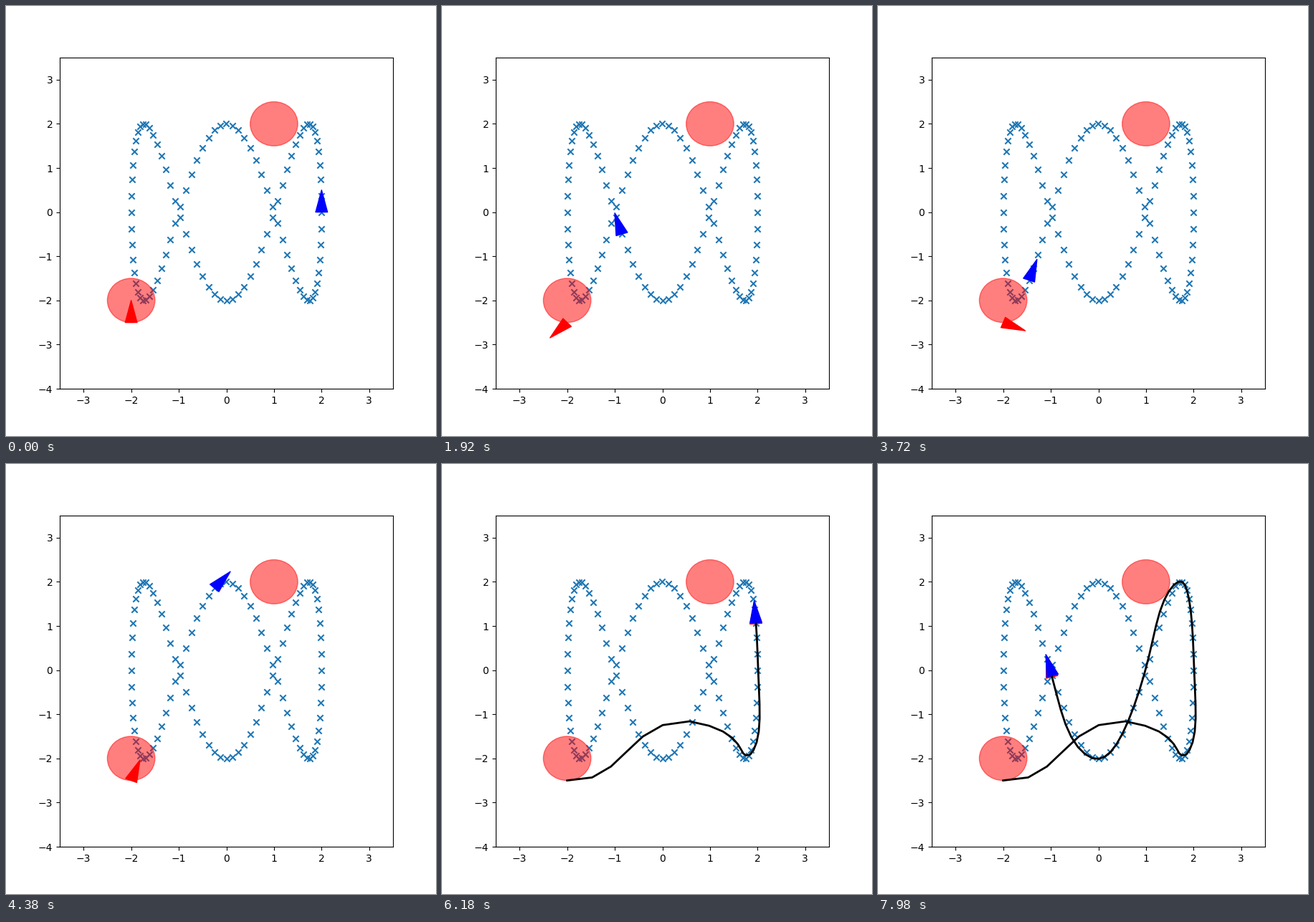
Animation, 600 px wide and 600 px high, one loop 8000 ms. Source, as a matplotlib script:

```python
import numpy as np
import matplotlib.pyplot as plt
from matplotlib.animation import FuncAnimation

STEPS = 134             # simulation steps in one loop, 60 ms each
SUB = 3                 # drawn frames per step
DT = 0.06283185         # leader phase per step, 100 steps per lap
LAUNCH, CREST, JOIN = 79, 85, 92    # chaser starts, passes its crest, joins


def curve(t):
    return np.column_stack([2 * np.cos(t), 2 * np.sin(3 * t)])


def tangent(t):
    v = np.column_stack([-2 * np.sin(t), 6 * np.cos(3 * t)])
    return v / np.hypot(*v.T)[:, None]


def bezier(p0, p1, p2, p3, n):
    """Cubic curve sampled at n equal time steps, both ends included."""
    s = np.linspace(0, 1, n + 1)[:, None]
    p0, p1, p2, p3 = map(np.array, (p0, p1, p2, p3))
    return ((1 - s) ** 3 * p0 + 3 * s * (1 - s) ** 2 * p1
            + 3 * s ** 2 * (1 - s) * p2 + s ** 3 * p3)


def follow(t, lag=0.004, delay=4.3 * DT, drift=0.09):
    """Track the curve, drifting outwards just after each sharp turn."""
    u = t - delay
    turn = np.sign(np.sin(u) * np.sin(3 * u)) * np.sin(3 * u) ** 6
    d = tangent(t - lag)
    right = np.column_stack([d[:, 1], -d[:, 0]])
    return curve(t - lag) + drift * turn[:, None] * right


k = np.arange(STEPS + 1)
t = DT * k
leader = curve(t)
leader_dir = tangent(t)

# Chaser: waits, drives over a crest, then settles onto the leader's path
start, crest, join = (-2, -2.5), (0.57, -1.16), (1.75, -1.93)
chaser = follow(t)
gap = join - chaser[JOIN]
chaser[JOIN:] += gap * 0.5 ** (k[JOIN:, None] - JOIN)
chaser[:LAUNCH] = start
chaser[LAUNCH:CREST + 1] = bezier(start, (-0.77, -2.6), (-0.75, -1.1), crest,
                                  CREST - LAUNCH)
chaser[CREST:JOIN + 1] = bezier(crest, (1.7, -1.35), (1.61, -1.9), join,
                                JOIN - CREST)

# While waiting it turns on the spot through a few headings (step, degrees)
turns = [(0, 90), (14, 224), (18, 219), (28, 186), (32, 224), (42, 232),
         (52, 269), (56, 270), (70, 429), (74, 428), (LAUNCH, 363)]
wait = np.radians(np.interp(k, *zip(*turns)))
chaser_dir = np.gradient(chaser, axis=0)
chaser_dir[:LAUNCH + 1] = np.column_stack([np.cos(wait), np.sin(wait)])[:LAUNCH + 1]
chaser_dir /= np.hypot(*chaser_dir.T)[:, None]


def arrow(pos, d, length=0.5, half=0.125):
    """Triangle with the middle of its base at pos, pointing along d."""
    side = half * np.array([-d[1], d[0]])
    return np.array([pos + side, pos + length * d, pos - side])


fig, ax = plt.subplots(figsize=(6, 6), dpi=100)
ax.set_xlim(-3.5, 3.5)
ax.set_ylim(-4, 3.5)
ax.scatter(*leader[:100].T, marker="x")
for center in [(-2, -2), (1, 2)]:
    ax.add_patch(plt.Circle(center, 0.5, color="r", alpha=0.5))

red, blue = (
    ax.add_patch(plt.Polygon(arrow(p[0], d[0]), color=c, joinstyle="round"))
    for p, d, c in [(chaser, chaser_dir, "r"), (leader, leader_dir, "b")])
trail, = ax.plot([], [], "k-", lw=2)


def update(frame):
    n = frame // SUB
    red.set_xy(arrow(chaser[n], chaser_dir[n]))
    blue.set_xy(arrow(leader[n], leader_dir[n]))
    path = chaser[LAUNCH:n + 1] if n > LAUNCH else chaser[:0]
    trail.set_data(path[:, 0], path[:, 1])
    return red, blue, trail


# The last step is cut short, so 400 frames of 20 ms make one loop
anim = FuncAnimation(fig, update, frames=400, interval=20,
                     repeat=True, repeat_delay=0, blit=False)
plt.show()
```
